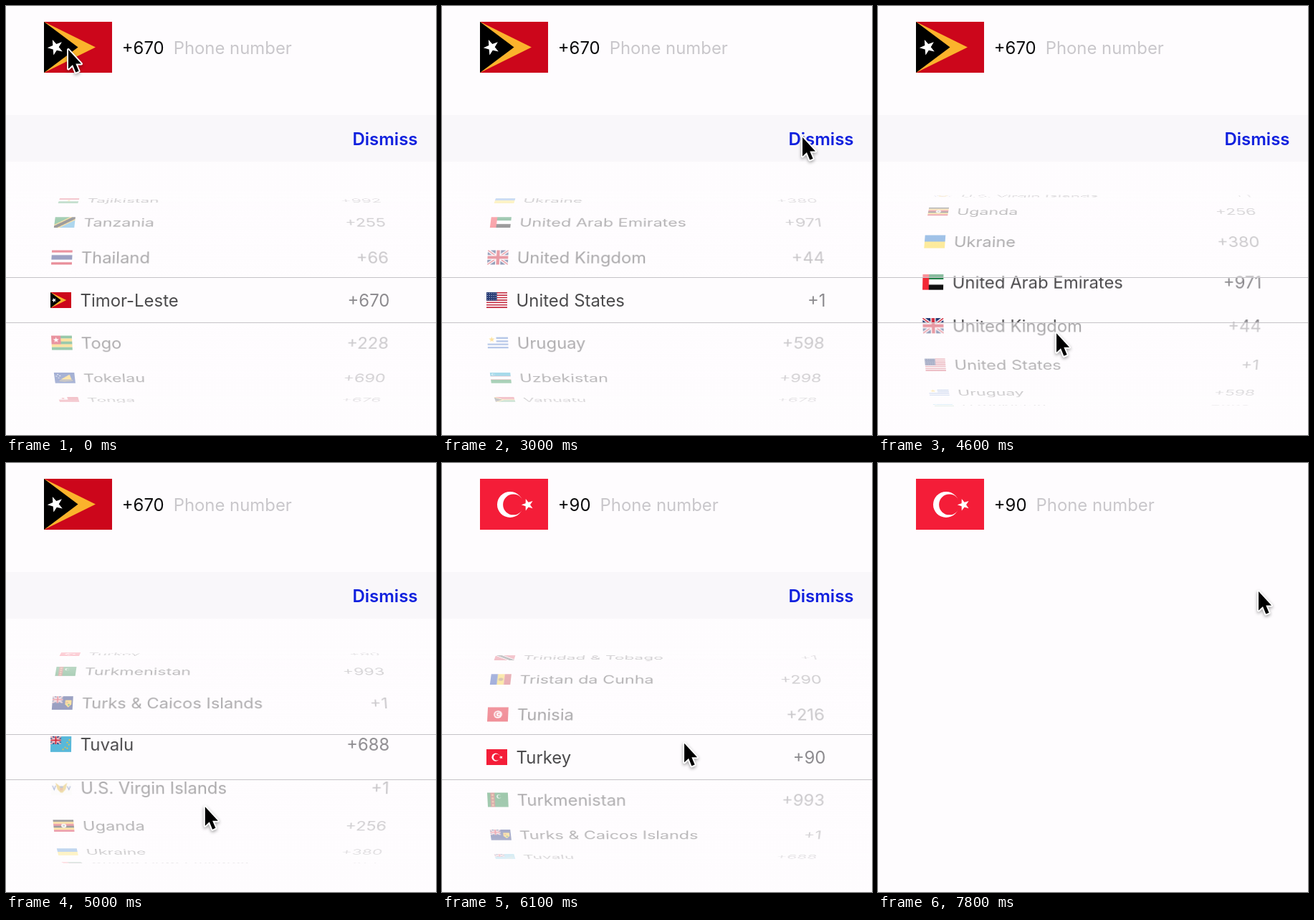
Write an HTML page that moves like this. It is 600x598 px and loops after 8 s.

```html
<!DOCTYPE html>
<html lang="en">
<head>
<meta charset="utf-8">
<style>
html, body { margin: 0; width: 600px; height: 598px; overflow: hidden; background: #fefcfe; }
body { position: relative; font: 400 23.9px/60px Inter, sans-serif; white-space: nowrap; }
div, body > svg, .row > *, header > * { position: absolute; }
svg { display: block; }
#bigFlag { left: 53px; top: 22px; width: 95px; height: 71px; }
#phone { left: 161.8px; top: 28.6px; color: #0b0b0c; }
#phone span { margin-left: 13px; color: #c9c7cb; }
#picker { inset: 0; }
#sheet { inset: 152px 0 0; background: #fefcfe; }
#bar { top: 152px; width: 600px; height: 65px; background: #f9f7fa; }
#bar b { position: absolute; right: 25.5px; top: 3.6px; font-weight: 600; font-size: 24px; color: #1020de; }
#wheel { inset: 0; perspective: 1800px; perspective-origin: 300px 410px; clip-path: inset(256px 0 40px); }
.row { top: 380px; width: 600px; height: 60px; color: #4b4a4c; backface-visibility: hidden; }
.row svg { left: 62px; top: 19px; width: 29.3px; height: 22px; }
.row span { left: 103.6px; top: .8px; }
.row i { right: 64.6px; top: .8px; font-style: normal; color: #8d8b8f; }
.veil { width: 600px; --c: 254, 252, 254; }
#above { top: 217px; height: 161px; border-bottom: 1px solid #c5c3c7;
  background: linear-gradient(0deg, rgba(var(--c), .5), rgba(var(--c), .6) 50%, rgba(var(--c), .78) 68%, rgba(var(--c), .92) 76%); }
#below { top: 441px; height: 160px; border-top: 1px solid #c5c3c7;
  background: linear-gradient(rgba(var(--c), .52), rgba(var(--c), .62) 50%, rgba(var(--c), .78) 67%, rgba(var(--c), .92) 74%); }
#cursor { left: -6px; top: -6px; width: 40px; height: 50px; filter: drop-shadow(0 2px 2px rgba(0, 0, 0, .35)); }
</style>
</head>
<body>
<header><div id="bigFlag"></div><div id="phone"><b style="font-weight:400"></b><span>Phone number</span></div></header>
<div id="picker">
  <div id="sheet"></div>
  <div id="wheel"></div>
  <div id="above" class="veil"></div>
  <div id="below" class="veil"></div>
  <div id="bar"><b>Dismiss</b></div>
</div>
<svg id="cursor" viewBox="-6 -6 40 50">
  <path d="M0 0V26.500L6 21 10.300 31.500 14.600 29.700 10.300 19.500H18Z" stroke="#fff" stroke-width="4" stroke-linejoin="round" paint-order="stroke"/>
</svg>
<script>
// Flag parts, drawn on a 40 x 30 field
const rect = (c, x = 0, y = 0, w = 40, h = 30) => `<rect x="${x}" y="${y}" width="${w}" height="${h}" fill="${c}"/>`;
const disc = (c, x, y, r) => `<circle cx="${x}" cy="${y}" r="${r}" fill="${c}"/>`;
const poly = (c, points) => `<polygon points="${points}" fill="${c}"/>`;
const line = (c, w, d) => `<path d="${d}" stroke="${c}" stroke-width="${w}" fill="none"/>`;
const rows = (...cs) => cs.map((c, i) => rect(c, 0, i * 30 / cs.length, 40, 30 / cs.length + .1)).join('');
const cols = (...cs) => cs.map((c, i) => rect(c, i * 40 / cs.length, 0, 40 / cs.length + .1)).join('');
const star = (c, x, y, r, turn = -90) => poly(c, Array.from({ length: 10 }, (_, i) => {
  const a = (turn + i * 36) * Math.PI / 180, d = i % 2 ? r * .4 : r;
  return `${(x + d * Math.cos(a)).toFixed(2)},${(y + d * Math.sin(a)).toFixed(2)}`;
}).join(' '));
const crescent = (c, field, x, y, r) => disc(c, x, y, r) + disc(field, x + r * .25, y, r * .8);
const band = (edge, fill, d) => line(edge, 13, d) + line(fill, 8, d);
const diagonals = 'M0 0L40 30M40 0L0 30', cross = 'M20 0V30M0 15H40';
const jack = rect('#20356f') + line('#fff', 6, diagonals) + line('#cf2a3d', 2, diagonals) + line('#fff', 10, cross) + line('#cf2a3d', 6, cross);
const ensign = field => rect(field) + `<svg width="20" height="15" viewBox="0 0 40 30">${jack}</svg>`;
const flag = art => `<svg viewBox="0 0 40 30" width="100%" height="100%" preserveAspectRatio="none">${art}</svg>`;

const red = '#d0142c', white = '#fff', green = '#1d8a45', blue = '#20409a', gold = '#fcc32d', black = '#111';
const countries = [
  ['Taiwan', 886, rect(red) + rect(blue, 0, 0, 20, 15) + disc(white, 10, 7.5, 4)],
  ['Tajikistan', 992, rows(red, white, green) + disc(gold, 20, 15, 3)],
  ['Tanzania', 255, rect('#3a9fd6') + poly(green, '0,0 40,0 0,30') + band(gold, black, 'M-4 33L44 -3')],
  ['Thailand', 66, rows(red, white, '#2c3a80', '#2c3a80', white, red)],
  ['Timor-Leste', 670, rect('#cc061b') + poly('#fbb32c', '0,0 30.300,15 0,30') + poly('#000', '0,0 20,15 0,30') + star(white, 6.8, 15, 4.8, -112)],
  ['Togo', 228, rows(green, gold, green, gold, green) + rect(red, 0, 0, 18, 18) + star(white, 9, 9, 6)],
  ['Tokelau', 690, rect('#1b3c94') + poly(gold, '11,20 30,5 33,20') + line(gold, 2, 'M9 23Q20 25 35 22') + [[7, 5], [4, 10], [11, 9], [8, 15]].map(([x, y]) => star(white, x, y, 2)).join('')],
  ['Tonga', 676, rect(red) + rect(white, 0, 0, 18, 14) + line(red, 3, 'M9 2V12M4 7H14')],
  ['Trinidad & Tobago', 1, rect(red) + band(white, black, 'M2 -3L38 33')],
  ['Tristan da Cunha', 290, cols('#2546ad', '#f7ce35', '#c9404c') + disc('#a67441', 20, 15, 4.5)],
  ['Tunisia', 216, rect('#e21b2c') + disc(white, 20, 15, 8) + crescent('#e21b2c', white, 20, 15, 5.500) + star('#e21b2c', 22, 15, 3)],
  ['Turkey', 90, rect('#f41d38') + crescent(white, '#f41d38', 17.7, 15.2, 7.6) + star(white, 28, 15.300, 3.7, 180)],
  ['Turkmenistan', 993, rect('#2d8a4b') + rect('#b04a45', 6, 0, 8) + [5, 12, 19, 26].map(y => disc('#dfa36b', 10, y, 2)).join('') + crescent(white, '#2d8a4b', 22, 8, 4)],
  ['Turks & Caicos Islands', 1, ensign('#1f2f78') + poly(gold, '25,9 37,9 37,18 31,25 25,18') + disc('#d4793f', 29, 14, 2) + disc(green, 32, 19, 2)],
  ['Tuvalu', 688, ensign('#58b8da') + [[24, 25], [28, 21], [32, 23], [35, 16], [32, 12], [36, 7]].map(([x, y]) => star(gold, x, y, 2.2)).join('')],
  ['U.S. Virgin Islands', 1, rect('#fbfaf8') + poly('#dfba4b', '9,5 17,12 23,12 31,5 28,18 22,25 18,25 12,18') + rect('#7082b5', 17, 12, 6, 3) + line('#ce6360', 1, 'M17 17H23M18.500 16V21M21 16V21') + line('#4965ab', 1.5, 'M3 11L6 19 9 11M31 12L34 19 37 12')],
  ['Uganda', 256, rows(black, gold, red, black, gold, red) + disc('#eee', 20, 15, 5) + disc('#777', 20, 15, 2)],
  ['Ukraine', 380, rows('#2575c9', '#fbd523')],
  ['United Arab Emirates', 971, rows('#147b3f', white, black) + rect('#f32835', 0, 0, 12)],
  ['United Kingdom', 44, jack],
  ['United States', 1, rows(...Array.from({ length: 13 }, (_, i) => i % 2 ? white : '#c3283e')) + rect('#283c75', 0, 0, 20, 16) + Array.from({ length: 20 }, (_, i) => disc('#c8cee2', 2 + i % 5 * 4, 2 + (i / 5 | 0) * 4, .8)).join('')],
  ['Uruguay', 598, rows(white, '#4d79c6', white, '#4d79c6', white, '#4d79c6', white, '#4d79c6', white) + rect(white, 0, 0, 17, 16.500) + star(gold, 8.500, 8, 6)],
  ['Uzbekistan', 998, rows('#22a5cc', white, green) + line(red, 1, 'M0 10H40M0 20H40') + crescent(white, '#22a5cc', 6, 5, 3)],
  ['Vanuatu', 678, rows(red, green) + line(gold, 4, 'M0 0L17 15H40M17 15L0 30') + poly(black, '0,2 15,15 0,28')],
];
const FIRST = 4, RADIUS = 160, STEP = 22;

const $ = id => document.getElementById(id);
const dial = document.querySelector('#phone b');
const items = countries.map(([name, code, art]) => {
  const row = document.createElement('div');
  row.className = 'row';
  row.innerHTML = `${flag(art)}<span>${name.replace('&', '&amp;')}</span><i>+${code}</i>`;
  return $('wheel').appendChild(row);
});

// Monotone cubic through [time, value] keys
function track(keys, t, k = 1) {
  const slope = i => keys[i] && keys[i + 1] ? (keys[i + 1][k] - keys[i][k]) / (keys[i + 1][0] - keys[i][0]) : 0;
  const tangent = i => { const a = slope(i - 1), b = slope(i); return a * b > 0 ? 2 * a * b / (a + b) : 0; };
  if (t <= keys[0][0]) return keys[0][k];
  const i = keys.findIndex((key, n) => n + 1 < keys.length && t < keys[n + 1][0]);
  if (i < 0) return keys[keys.length - 1][k];
  const w = keys[i + 1][0] - keys[i][0], u = (t - keys[i][0]) / w, v = 1 - u;
  return keys[i][k] * v * v * (1 + 2 * u) + keys[i + 1][k] * u * u * (3 - 2 * u) + w * u * v * (tangent(i) * v - tangent(i + 1) * u);
}

const wheelKeys = [[100, 0], [800, 16], [4350, 16], [4600, 14.42], [4750, 12.9], [5000, 10.3], [5250, 9.42], [5400, 9.42], [5700, 7.500], [5950, 7]];
const cursorKeys = [[2100, 87, 61], [2850, 503, 183], [3350, 503, 183], [4250, 238, 361], [4600, 249, 456], [4800, 262, 544], [5350, 297, 330],
  [5400, 297, 330], [5750, 318, 420], [6100, 338, 391], [6750, 531, 179]];
const slideKeys = [[7050, 0], [7400, 450]];

let shown;
function frame(now) {
  const t = now % 8000, position = track(wheelKeys, t);
  items.forEach((row, i) => {
    const angle = (position + FIRST - i) * STEP;
    row.style.display = Math.abs(angle) < 90 ? '' : 'none';
    row.style.transform = `translateZ(${-RADIUS}px) rotateX(${angle}deg) translateZ(${RADIUS}px)`;
  });
  const chosen = FIRST + (t < 6000 ? 0 : 7);
  if (chosen !== shown) {
    shown = chosen;
    $('bigFlag').innerHTML = flag(countries[chosen][2]);
    dial.textContent = '+' + countries[chosen][1];
  }
  $('picker').style.transform = `translateY(${track(slideKeys, t)}px)`;
  $('cursor').style.transform = `translate(${track(cursorKeys, t)}px, ${track(cursorKeys, t, 2)}px)`;
  requestAnimationFrame(frame);
}
requestAnimationFrame(frame);
</script>
</body>
</html>
```
